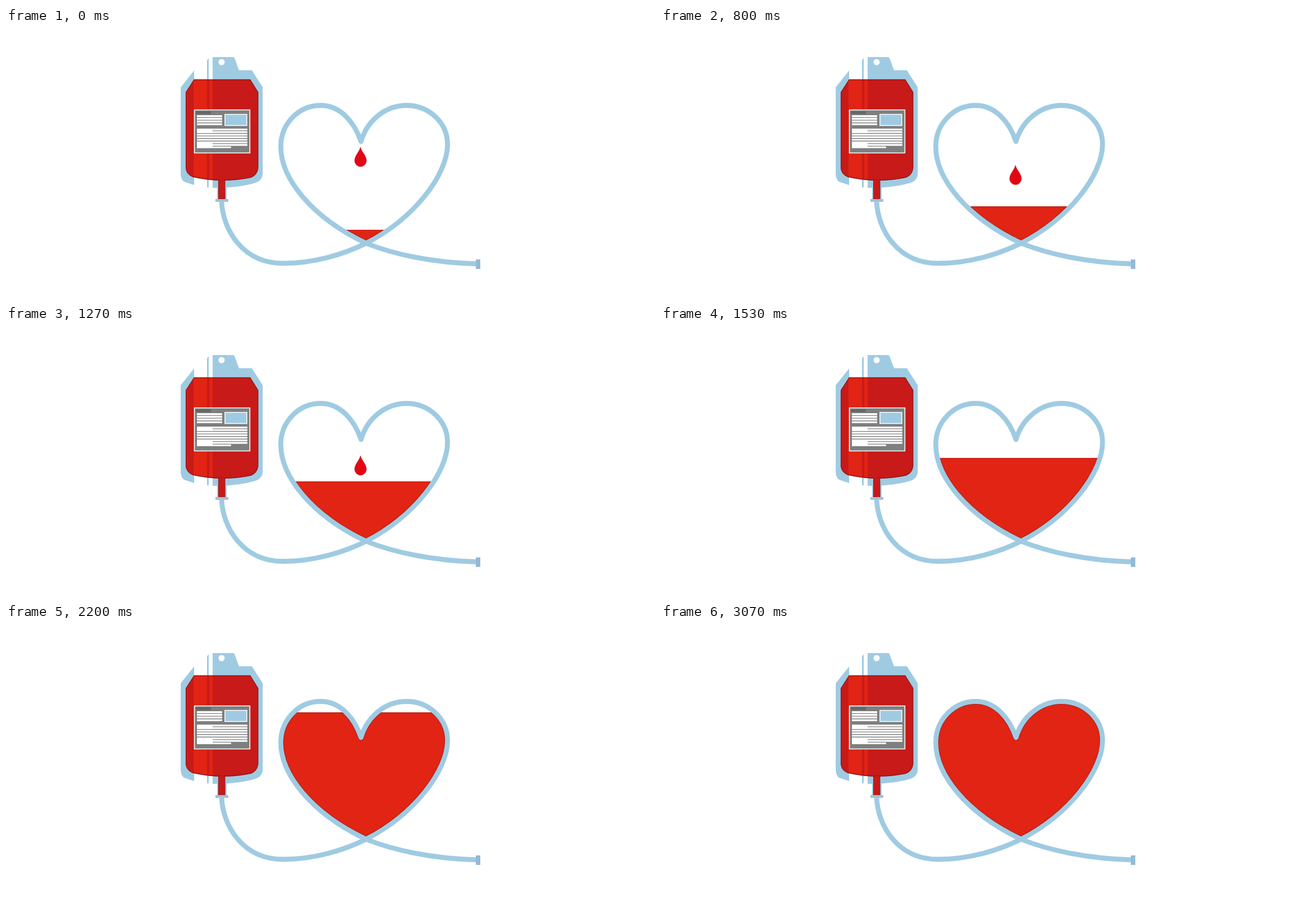
Recreate the animation shown at these times as an HTML page without scripts. Size 1159 px wide and 483 px high, loop 3140 ms.

```html
<!DOCTYPE html>
<html lang="en">
<head>
<meta charset="utf-8">
<title>Blood donation</title>
<style>
  html, body { margin: 0; width: 100%; height: 100%; overflow: hidden; background: #fff; }
  svg { display: block; width: 100%; height: 100%; }
  .blue { fill: #9fcbe2; }
  .tube { fill: none; stroke: #9fcbe2; stroke-width: 8.8; stroke-linejoin: round; }
  .lines { stroke: #fff; fill: none; }

  .level { animation: rise 3140ms linear infinite; }
  .drop { fill: #e30613; stroke: #cf1018; stroke-width: .8; animation: fall calc(3140ms / 6) infinite; }

  /* each drop lifts the surface once, sooner as the fall gets shorter */
  @keyframes rise {
    0%, 13.4% { transform: translateY(0); }
    15.9%, 28.8% { transform: translateY(-42px); }
    31.4%, 42.6% { transform: translateY(-83px); }
    45.2%, 52.9% { transform: translateY(-125px); }
    55.4%, 67.5% { transform: translateY(-163px); }
    69.7%, 84% { transform: translateY(-203px); }
    86.3%, 100% { transform: translateY(-244px); }
  }
  @keyframes fall {
    0%, 18% { transform: translateY(0); animation-timing-function: cubic-bezier(.45, .1, .8, .7); }
    100% { transform: translateY(130px); }
  }
</style>
</head>
<body>
<svg viewBox="0 0 1159 483" preserveAspectRatio="none">
  <defs>
    <path id="heart" d="M643 385C730 340 788.5 262 788.5 208C788.5 170 756 138.5 715 138.5C678 138.5 645 165 634 203C622 168 597 138.5 562 138.5C522 138.5 490.7 172 490.7 212C490.7 268 544 338 643 385Z"/>
    <path id="blood" d="M336 92.5H436L450 115V250Q449 262 438 267Q385 278 333 266Q322 261 321.5 250V115Z"/>
    <clipPath id="inHeart"><use href="#heart"/></clipPath>
    <clipPath id="inBlood"><use href="#blood"/></clipPath>
    <clipPath id="inLevel"><rect class="level" x="480" y="361.5" width="320" height="300"/></clipPath>
  </defs>

  <!-- bag -->
  <g class="blue">
    <path d="M336 76L312 106V262Q313 272 318 275L336 281Z"/>
    <path d="M359 58L362 54V285H359Z"/>
    <path d="M369 52H405Q408 52 409 56L416 75.5H439L458.5 106V262Q457 272 448 276Q420 286 369 286Z"/>
    <path d="M377 272H394V308H377Z"/>
  </g>
  <circle cx="385" cy="61" r="5.5" fill="#fff"/>
  <g clip-path="url(#inBlood)">
    <path fill="#c81a18" d="M320 90H452V280H320Z"/>
    <path fill="#e12414" d="M335 90H359V280H335ZM363 90H369V280H363Z"/>
  </g>
  <use href="#blood" fill="none" stroke="#8c1717" stroke-width="1.3"/>
  <path fill="#c81a18" stroke="#8c1717" d="M379.5 272V306H391V272"/>
  <path fill="#a5bfd6" d="M374 306H397V311H374Z"/>

  <!-- label -->
  <path fill="#7f7f7f" stroke="#fff" stroke-width="1.6" d="M336.5 146.5H435.5V223.5H336.5Z"/>
  <path fill="#666" d="M339 149H366V154H339Z"/>
  <path class="blue" stroke="#fff" stroke-width="1.5" d="M391 154.5H430V174.5H391Z"/>
  <g class="lines">
    <path stroke-width="45" stroke-dasharray="3.4 1.4" d="M363.5 156V175"/>
    <path stroke-width="90" stroke-dasharray="3.2 1.4" d="M386 180V212"/>
    <path stroke-width="28" d="M355 180V188M355 204V215"/>
    <path stroke-width="3" d="M341 213.5H402"/>
  </g>

  <!-- drop and liquid -->
  <path class="drop" d="M633 213.5C635 222 643.5 228 643.5 237.5A10.4 10.4 0 0 1 622.7 237.5C622.7 228 631 222 633 213.5Z"/>
  <g clip-path="url(#inHeart)">
    <rect class="level" x="480" y="361.5" width="320" height="300" fill="#e12414" stroke="#b81c14"/>
    <g clip-path="url(#inLevel)">
      <use href="#heart" fill="none" stroke="#a81a14" stroke-width="10.6" stroke-linejoin="round"/>
    </g>
  </g>

  <!-- tube -->
  <g class="tube">
    <path d="M385 310C387 360 422 421 495 421C550 421 603 405 643 385C690 404 760 420 843 422"/>
    <use href="#heart"/>
  </g>
  <path fill="#93bad6" d="M839 414H847V431H839Z"/>
</svg>
</body>
</html>
```
